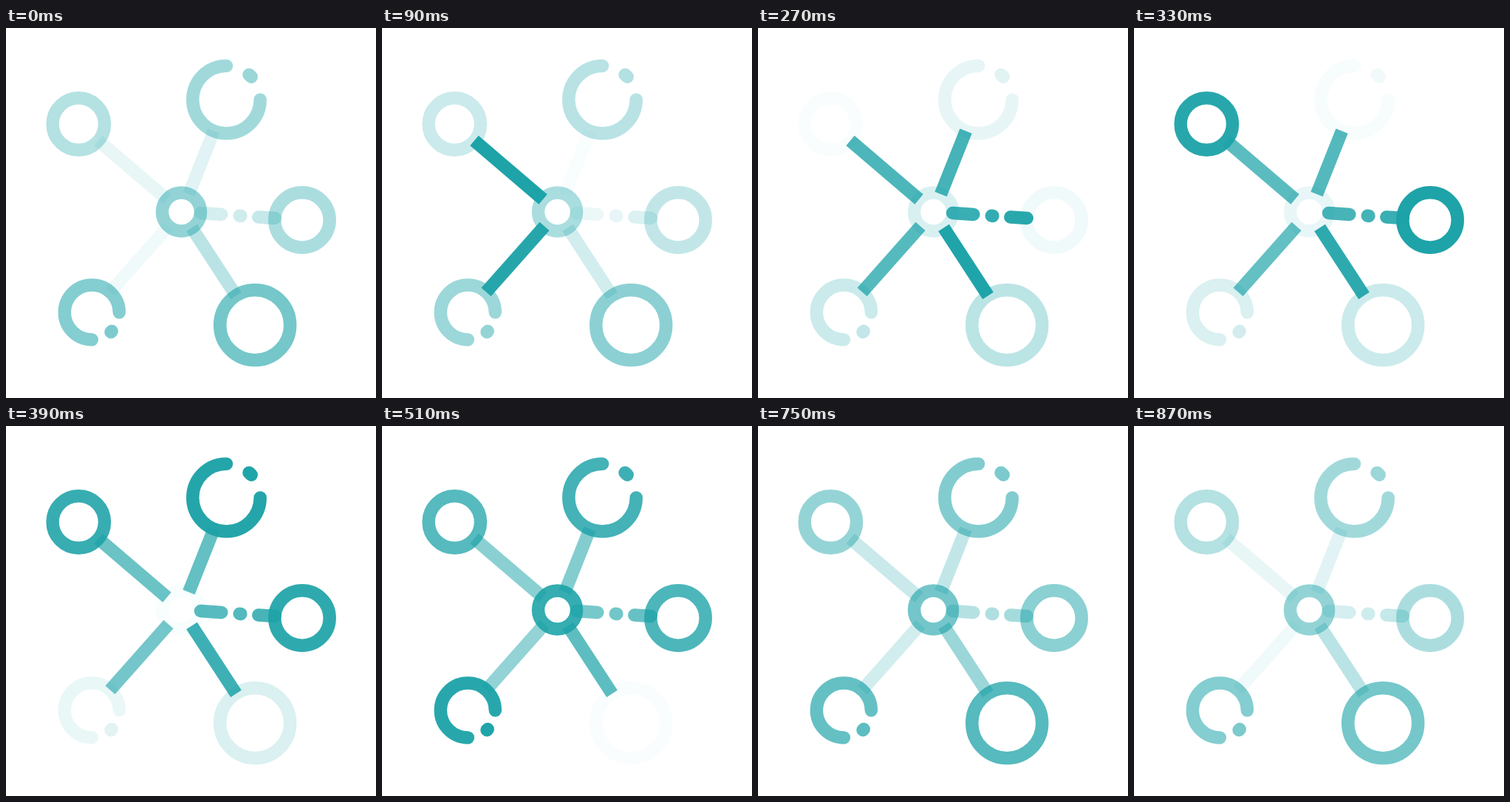
Write an HTML page that moves like this. It is 501 by 501 pixels and loops after 0.9 s.

```html
<!DOCTYPE html>
<html lang="en">
<head>
<meta charset="utf-8">
<title>Pulsing network</title>
<style>
  html, body { margin: 0; width: 100%; height: 100%; overflow: hidden; background: #fff; }
  svg { display: block; width: 100vw; height: 100vh; }
</style>
</head>
<body>
<svg id="stage" viewBox="0 0 501 501" fill="none" stroke="#1da3a8" stroke-width="17.5"></svg>
<script>
const STEP = 30, STEPS = 30;
const stage = document.getElementById('stage');
const parts = [];

// start: point in the cycle where the part flashes to full strength
function add(start, d, cap = 'butt') {
  const el = document.createElementNS('http://www.w3.org/2000/svg', 'path');
  el.setAttribute('d', d);
  el.setAttribute('stroke-linecap', cap);
  stage.appendChild(el);
  parts.push({ el, start });
}

const line = (start, x1, y1, x2, y2, cap) =>
  add(start, `M${x1} ${y1}L${x2} ${y2}`, cap);

const ring = (start, x, y, r) =>
  add(start, `M${x - r} ${y}a${r} ${r} 0 1 1 ${2 * r} 0a${r} ${r} 0 1 1 ${-2 * r} 0z`);

// three-quarter arc, drawn counterclockwise from one quadrant point to another
const arc = (start, r, x1, y1, x2, y2) =>
  add(start, `M${x1} ${y1}A${r} ${r} 0 1 0 ${x2} ${y2}`, 'round');

// spokes
line(0.06, 220, 268.5, 141, 357.5);
line(0.1, 218, 232, 125, 152.5);
line(0.13, 247.5, 225, 281.5, 139.5);
line(0.185, 263.5, 250.5, 291.8, 252.5, 'round');
line(0.21, 316.2, 254.3, 317.9, 254.4, 'round');
line(0.255, 341.8, 256, 364.2, 257.5, 'round');
line(0.3, 251.5, 270.5, 311.5, 362.5);

// nodes
ring(0.33, 98.3, 130, 35.2);
ring(0.37, 401, 260, 37.2);
arc(0.415, 45.7, 298.5, 51.3, 344.2, 97);
line(0.442, 329, 63.2, 332.2, 66.2, 'round');
ring(0.475, 237.5, 249, 26);
arc(0.54, 37, 153.3, 385, 116.3, 422);
line(0.575, 142, 411.7, 143.2, 410.6, 'round');
ring(0.608, 337.2, 402.2, 47.5);

function draw(ms) {
  const phase = Math.floor(ms / STEP) % STEPS / (STEPS - 1);
  for (const { el, start } of parts) {
    const age = (phase - start + 1) % 1;
    el.setAttribute('opacity', (1 - age).toFixed(3));
  }
}

const t0 = performance.now();
function tick(now) {
  draw(Math.max(0, now - t0));
  requestAnimationFrame(tick);
}
draw(0);
requestAnimationFrame(tick);
</script>
</body>
</html>
```
